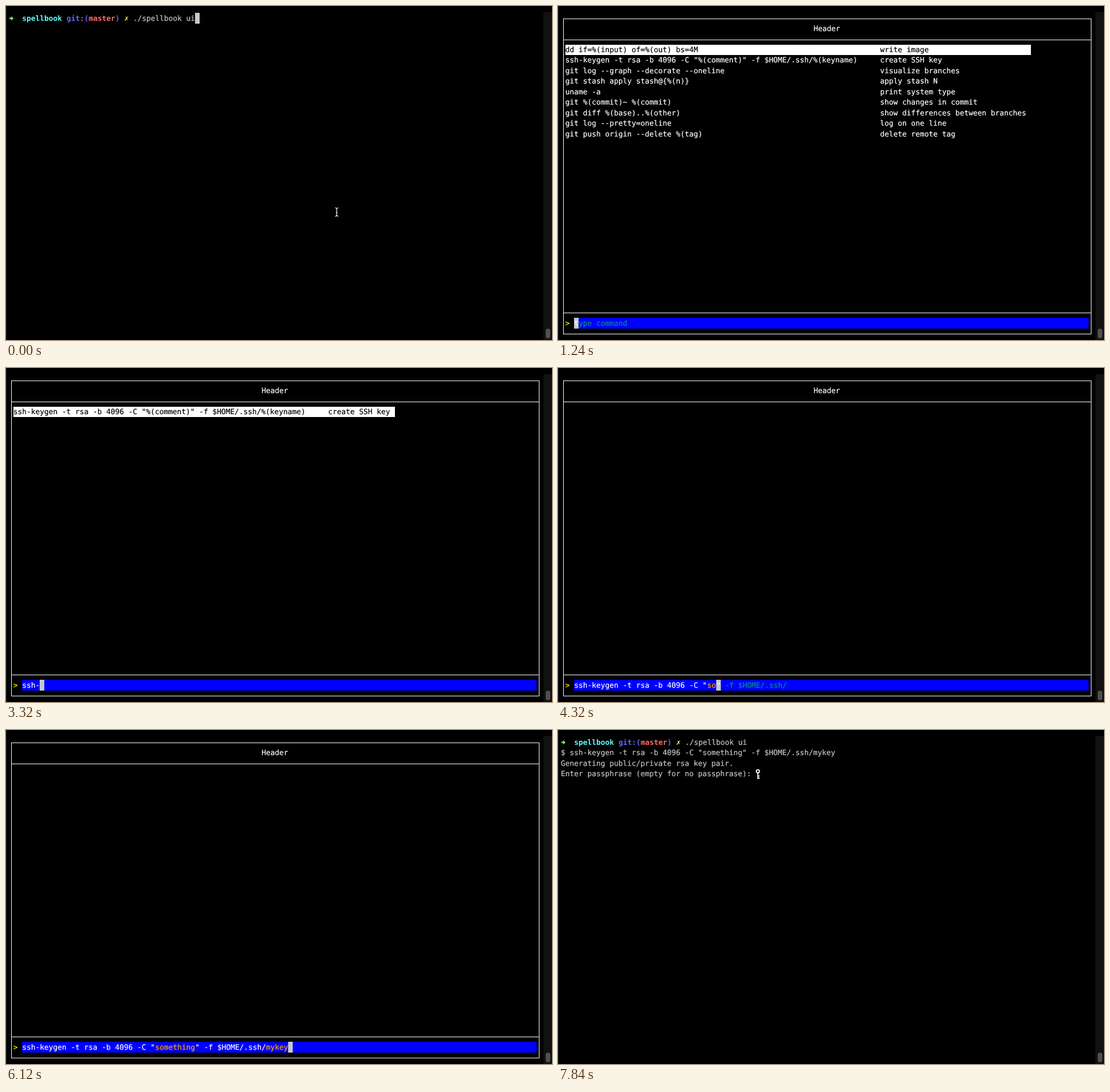
An HTML page that plays this animation: 956 by 586 pixels, repeating every 8640 ms.

```html
<!DOCTYPE html>
<html lang="en">
<head>
<meta charset="utf-8">
<title>Command picker</title>
<style>
  html, body { margin: 0; width: 100%; height: 100%; overflow: hidden; background: #000; }
  svg { display: block; width: 956px; height: 586px; }
  text {
    font: 12.898px "DejaVu Sans Mono", "Noto Sans Mono", monospace;
    text-rendering: geometricPrecision;
    white-space: pre;
    stroke-width: .2px;
  }
  .bold { font-weight: 700; stroke-width: 0; }
</style>
</head>
<body>
<svg viewBox="0 0 956 586">
  <rect width="956" height="586"/>
  <rect width="1" height="586" fill="#1c1c1c"/>
  <rect x="941" y="11" width="15" height="575" fill="#111"/>
  <rect x="945" y="566" width="8" height="17" rx="4" fill="#505050"/>
  <g id="screen"></g>
  <path id="pointer" fill="none" stroke="#fff" stroke-width="1.2"
    d="M-2.8-7.5Q0-7.3 0-5Q0-7.3 2.8-7.5M0-5.5V5.5M-2.8 7.5Q0 7.3 0 5Q0 7.3 2.8 7.5M-1.5 1H1.5"/>
</svg>
<script>
const LOOP = 8640;
const CELL_W = 7.765, CELL_H = 18.45, LEFT = 5, TOP = 12.3, BASELINE = 13.3;
const GREY = '#c7c7c7', WHITE = '#fff', TEAL = '#009080', ORANGE = '#ffa500';
const INPUT_ROW = 29, INPUT_COL = 3;

const COMMANDS = [
  ['dd if=%(input) of=%(out) bs=4M', 'write image'],
  ['ssh-keygen -t rsa -b 4096 -C "%(comment)" -f $HOME/.ssh/%(keyname)', 'create SSH key'],
  ['git log --graph --decorate --oneline', 'visualize branches'],
  ['git stash apply stash@{%(n)}', 'apply stash N'],
  ['uname -a', 'print system type'],
  ['git %(commit)~ %(commit)', 'show changes in commit'],
  ['git diff %(base)..%(other)', 'show differences between branches'],
  ['git log --pretty=oneline', 'log on one line'],
  ['git push origin --delete %(tag)', 'delete remote tag'],
];
const SEARCH_ORDER = [1, 8, 0, 3, 6, 2, 4, 5, 7];

// Times of the key presses for each typed word
const QUERY = ['ssh-', [2400, 2520, 2680, 3320]];
const COMMENT = ['something', [4240, 4320, 4360, 4440, 4520, 4600, 4680, 4720, 4800]];
const KEY_NAME = ['mykey', [5680, 5760, 5920, 6080, 6120]];

const screen = document.getElementById('screen');
const pointer = document.getElementById('pointer');

const colX = col => LEFT + col * CELL_W;
const rowY = row => TOP + row * CELL_H;
const escapeText = s => s.replace(/&/g, '&amp;').replace(/</g, '&lt;').replace(/>/g, '&gt;');
const typed = ([word, times], t) => word.slice(0, times.filter(at => at <= t).length);

const rect = (x, y, w, h, fill) =>
  `<rect x="${x}" y="${y}" width="${w}" height="${h}" fill="${fill}"/>`;

// Cell backgrounds sit on whole pixels
function cells(col, row, count, fill) {
  const x = Math.round(colX(col)), y = Math.round(rowY(row));
  return rect(x, y, Math.round(colX(col + count)) - x, Math.round(rowY(row + 1)) - y, fill);
}

const write = (col, row, string, fill = GREY, bold = false) =>
  `<text x="${colX(col)}" y="${rowY(row) + BASELINE}" fill="${fill}" stroke="${fill}"${bold ? ' class="bold"' : ''}>${escapeText(string)}</text>`;

function writeRuns(col, row, runs) {
  let out = '';
  for (const [string, fill, bold] of runs) {
    if (string) out += write(col, row, string, fill, bold);
    col += string.length;
  }
  return out;
}

const cursor = (col, row, under = '') =>
  cells(col, row, 1, GREY) + (under && write(col, row, under, WHITE));

function prompt() {
  return '<path d="M6 20.5H9V18L13.3 21.7L9 25.4V22.9H6z" fill="#5ffa68"/>' +
    writeRuns(3, 0, [
      ['spellbook ', '#60fdff', true],
      ['git:(', '#6464ff', true],
      ['master', '#ff6e67', true],
      [') ', '#6464ff', true],
      ['✗ ', '#fffc67', true],
      ['./spellbook ui', GREY],
    ]);
}

function matches(query, command) {
  let i = 0;
  for (const c of command) if (c === query[i]) i++;
  return i === query.length;
}

function commandList(query) {
  const items = query
    ? SEARCH_ORDER.map(i => COMMANDS[i]).filter(([command]) => matches(query, command))
    : COMMANDS;
  const widest = Math.max(...items.map(([, about]) => about.length));
  return cells(1, 3, 72 + widest, WHITE) + items.map(([command, about], i) => {
    const fill = i ? WHITE : '#000';
    return write(1, 3 + i, command, fill) + write(72, 3 + i, about, fill);
  }).join('');
}

function frame() {
  return [22, 59, 538, 575].map(y => rect(9, y, 925, 1, WHITE)).join('') +
    [9, 933].map(x => rect(x, 22, 1, 554, WHITE)).join('') +
    write(57, 1, 'Header', WHITE) +
    write(1, INPUT_ROW, '>', '#ffff00') +
    cells(INPUT_COL, INPUT_ROW, 116, '#00f');
}

function input(runs, cursorAt) {
  const whole = runs.map(([string]) => string).join('');
  return writeRuns(INPUT_COL, INPUT_ROW, runs) +
    cursor(INPUT_COL + cursorAt, INPUT_ROW, (whole[cursorAt] || '').trim());
}

function picker(t) {
  if (t < 4240) {
    const query = typed(QUERY, t);
    return frame() + commandList(query) +
      input([query ? [query, WHITE] : ['type command', TEAL]], query.length);
  }
  const start = 'ssh-keygen -t rsa -b 4096 -C "';
  const rest = '" -f $HOME/.ssh/';
  const comment = typed(COMMENT, t), name = typed(KEY_NAME, t);
  const naming = t >= 5080;
  const runs = [[start, WHITE], [comment, ORANGE], [rest, naming ? WHITE : TEAL], [name, ORANGE]];
  const end = start.length + comment.length;
  return frame() + input(runs, naming ? end + rest.length + name.length : end);
}

function keyIcon() {
  return '<g fill="none" stroke="#fff" stroke-width="1.8"><circle cx="350" cy="72.3" r="2.7"/>' +
    '<path d="M350 75V86M350 80.7H353.2M350 84.5H353.2"/></g>';
}

function result(t) {
  let out = prompt() + write(0, 1, '$ ssh-keygen -t rsa -b 4096 -C "something" -f $HOME/.ssh/mykey');
  if (t < 6760) return out + cursor(0, 2);
  out += write(0, 2, 'Generating public/private rsa key pair.');
  if (t < 7080) return out + cursor(0, 3);
  return out + write(0, 3, 'Enter passphrase (empty for no passphrase):') + keyIcon();
}

function content(t) {
  if (t < 1200) return prompt() + cursor(42, 0);
  if (t < 1240) return '';
  return t < 6720 ? picker(t) : result(t);
}

function pointerPosition(t) {
  if (t < 80) return [579, 361.5];
  if (t >= 7760 && t < 7800) return [583.5, 361];
  if (t >= 7800 && t < 7840) return [730.5, 330.5];
  return null;
}

let shown = null;
function draw(t) {
  const next = content(t);
  if (next !== shown) screen.innerHTML = shown = next;
  const at = pointerPosition(t);
  pointer.setAttribute('visibility', at ? 'visible' : 'hidden');
  if (at) pointer.setAttribute('transform', `translate(${at})`);
}

const began = performance.now();
function tick() {
  draw((performance.now() - began) % LOOP);
  requestAnimationFrame(tick);
}
tick();
</script>
</body>
</html>
```
